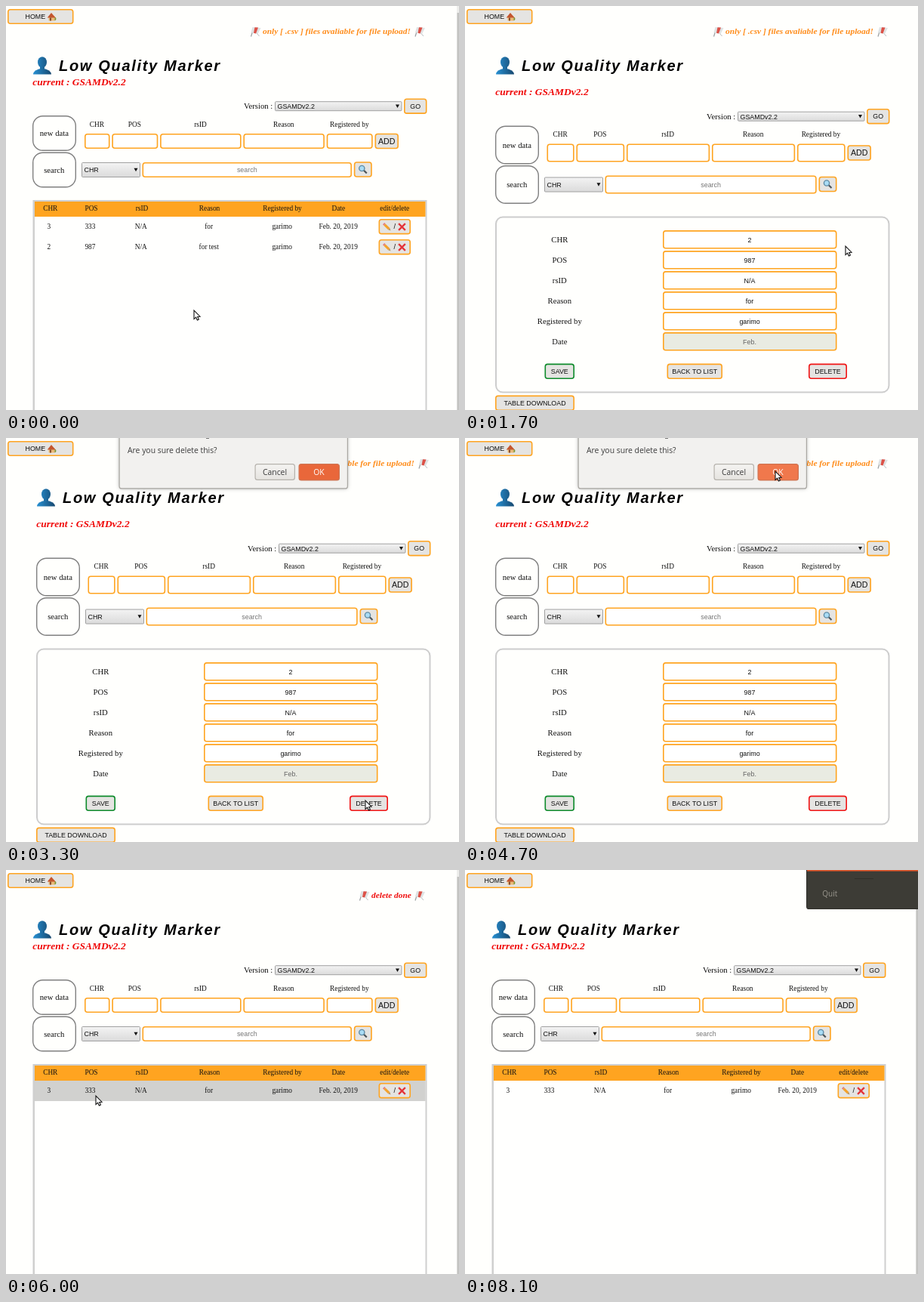
Write an HTML page with a canvas that moves like this. It is 600 px wide and 535 px high and loops after 8.3 s.

```html
<!DOCTYPE html>
<html lang="en">
<head>
<meta charset="utf-8">
<title>Low Quality Marker</title>
<style>
html, body { margin: 0; width: 100%; height: 100%; overflow: hidden; background: #fffffd; }
canvas { display: block; }
</style>
</head>
<body>
<canvas id="stage" width="600" height="535"></canvas>
<script>
const ctx = document.getElementById('stage').getContext('2d');
const LOOP = 8300, STEP = 100;
const SERIF = '"Liberation Serif", serif';
const SANS = '"Liberation Sans", sans-serif';
const UI = '"Open Sans", sans-serif';
const ORANGE = '#ffa420', BUTTON = '#e5e4e2', HOVER = '#d1d1cf', INK = '#111';
const SMALL = 8.89, MEDIUM = 9.33, LARGE = 10.67;
const GAP = 2.8, ROW = 27, HEAD_TOP = 259, HEAD_HEIGHT = 20;
const USER = 'garimo';

// Moments of the hard changes
const OPEN_FORM = 1700, SHOW_DIALOG = 3000, HIDE_DIALOG = 4800, BACK = 5000, MENU = 7400, MENU_HOT = 7900;

// The form page sits lower and further right, with roomier fields
const listLayout = { dx: 0, drop: 0, padX: 0, padY: 0 };
const formLayout = { dx: 5, drop: 13.5, padX: 2.7, padY: 4 };

const columns = [
  ['CHR', 41.5], ['POS', 67], ['rsID', 67], ['Reason', 112],
  ['Registered by', 81], ['Date', 67.5], ['edit/delete', 81.5]
];

// Pointer moves: from, until, x, y; it rests in between
const moves = [
  [0, 200, 400, 141], [200, 400, 535, 312], [500, 800, 561, 317], [800, 1400, 504, 318],
  [2000, 2900, 476, 480], [3400, 4300, 368, 69], [4300, 4700, 411, 44], [5400, 6000, 119, 299],
  [6300, 6600, 123, 265], [6600, 6900, 545, 30], [7300, 7500, 560, -20]
];

const clamp = v => Math.max(0, Math.min(1, v));
const ease = k => k * k * (3 - 2 * k);

function pointer(t) {
  const p = { x: 249, y: 403 };
  for (const [from, until, x, y] of moves) {
    const k = ease(clamp((t - from) / (until - from)));
    p.x += (x - p.x) * k;
    p.y += (y - p.y) * k;
  }
  return p;
}

// y is the middle of the capitals
function text(str, x, y, size, { font = SERIF, color = INK, align = 'center', style = '' } = {}) {
  ctx.font = `${style} ${size}px ${font}`;
  ctx.fillStyle = color;
  ctx.textAlign = align;
  ctx.fillText(str, x, y + size * 0.34);
}

function paint(fill, stroke, w = 1) {
  if (fill) { ctx.fillStyle = fill; ctx.fill(); }
  if (stroke) { ctx.strokeStyle = stroke; ctx.lineWidth = w; ctx.stroke(); }
}

function rect(x, y, w, h, fill) {
  ctx.fillStyle = fill;
  ctx.fillRect(x, y, w, h);
}

function box(x, y, w, h, fill, border, r = 3, line = 1.6) {
  ctx.beginPath();
  ctx.roundRect(x + line / 2, y + line / 2, w - line, h - line, r);
  paint(fill, border, line);
}

function poly(points, fill, stroke, w) {
  ctx.beginPath();
  points.forEach(([x, y]) => ctx.lineTo(x, y));
  ctx.closePath();
  paint(fill, stroke, w);
}

function line(x0, y0, x1, y1, color, w) {
  ctx.beginPath();
  ctx.moveTo(x0, y0);
  ctx.lineTo(x1, y1);
  paint(null, color, w);
}

function oval(x, y, rx, ry, fill, stroke, w, start = 0) {
  ctx.beginPath();
  ctx.ellipse(x, y, rx, ry, 0, start, Math.PI * 2);
  paint(fill, stroke, w);
}

function at(x, y, draw) {
  ctx.save();
  ctx.translate(x, y);
  draw();
  ctx.restore();
}

function shade(y, h, top, bottom) {
  const g = ctx.createLinearGradient(0, y, 0, y + h);
  g.addColorStop(0, top);
  g.addColorStop(1, bottom);
  return g;
}

function field(x, y, w, h, fill = '#fff') {
  box(x, y - h / 2, w, h, fill, ORANGE);
}

function button(x, y, w, label, { border = ORANGE, size = SMALL, h = 20.5 } = {}) {
  box(x, y - h / 2, w, h, BUTTON, border);
  text(label, x + w / 2, y, size, { font: SANS });
}

function select(x, y, w, h, label) {
  box(x, y - h / 2, w, h, shade(y - h / 2, h, '#f4f4f4', '#dadada'), '#a0a0a0', 1, 1);
  text(label, x + 3.5, y + 0.3, SMALL, { font: SANS, align: 'left' });
  at(x + w - 6, y, () => poly([[-2.5, -2.3], [2.5, -2.3], [0, 2.2]], INK));
}

function house(x, y) {
  at(x, y, () => {
    oval(4, 2.5, 2, 2.2, '#7c9a3a');
    rect(-4, -1, 8, 6, '#e8b878');
    poly([[-5.8, 1], [-0.5, -5.5], [5.2, 1]], '#c4562f');
    rect(-2.5, 1, 2, 4, '#8a5030');
  });
}

function megaphone(x, y) {
  at(x, y, () => {
    line(-4, 0, -6, 6.5, '#9a9fa1', 1.2);
    poly([[-4, -6], [7, -5], [3, 3], [-6, 1]], '#dfe3e4');
    poly([[-1, -5.8], [3.5, -5.4], [0.5, 2.4], [-2.5, 1.8]], '#dc5248');
    line(2, 2.5, 5, 6, '#b0b5b7', 0.9);
  });
}

function bust(x, y) {
  const g = ctx.createLinearGradient(x - 12, y, x + 12, y);
  g.addColorStop(0, '#2790d2');
  g.addColorStop(1, '#17486f');
  oval(x, y + 11.5, 12, 7.5, g, null, 0, Math.PI);
  rect(x - 3, y, 6, 6, g);
  oval(x, y - 4.5, 6, 7.3, g);
}

function magnifier(x, y) {
  line(x + 1, y + 1, x + 5, y + 5, '#4b5358', 2.2);
  oval(x - 1.5, y - 1.5, 3.6, 3.6, '#a9dcf5', '#5f8ba5', 1.4);
}

function pencil(x, y) {
  at(x, y, () => {
    ctx.rotate(Math.PI / 4);
    rect(-6.5, -1.6, 2, 3.2, '#e27b80');
    rect(-4.5, -1.6, 8, 3.2, '#f4a22c');
    poly([[3.5, -1.6], [6.8, 0], [3.5, 1.6]], '#b8935f');
  });
}

function cross(x, y) {
  for (const s of [-1, 1]) line(x - 4.4, y - 4.4 * s, x + 4.4, y + 4.4 * s, '#e3343a', 2.3);
}

function notice(dx, deleted) {
  const left = (deleted ? 474.5 : 330.5) + dx;
  megaphone(left, 34);
  megaphone(548 + dx, 34);
  text(deleted ? 'delete done' : 'only [ .csv ] files avaliable for file upload!',
    left + 9.5, 33, 11.4,
    { style: 'italic bold', align: 'left', color: deleted ? '#f01010' : '#ff8c1a' });
}

function heading({ dx, drop }) {
  box(2, 4, 87.5, 20, BUTTON, ORANGE);
  text('HOME', 25.5, 14.3, SMALL, { font: SANS, align: 'left' });
  house(60.5, 14.5);

  bust(48 + dx, 79);
  ctx.letterSpacing = '1.68px';
  text('Low Quality Marker', 70 + dx, 79.3, 20, { font: SANS, style: 'italic bold', align: 'left', color: '#000' });
  ctx.letterSpacing = '0px';
  text('current : GSAMDv2.2', 35.3 + dx, 100.4 + drop, 13.5, { style: 'italic bold', align: 'left', color: '#f00808' });

  const y = 132.7 + drop;
  text('Version :', 315 + dx, y, LARGE, { align: 'left' });
  select(356 + dx, y, 168.5, 13, 'GSAMDv2.2');
  button(527 + dx, y, 30.5, 'GO');
}

function toolbar({ dx, drop, padX, padY }) {
  const labelY = 156.5 + drop;
  const fieldY = labelY + 22.5 + padY / 2;
  const left = 104 + dx - padX / 5;
  let x = left;
  columns.slice(0, 5).forEach(([name], i) => {
    const w = [33.5, 61, 107.5, 107.5, 61][i] + padX;
    text(name, x + w / 2 - 0.4, labelY, MEDIUM);
    field(x, fieldY, w, 20 + padY);
    x += w + GAP;
  });
  button(x, fieldY, 31.5, 'ADD', { size: LARGE });

  const pill = 47 + padY;
  const middle = i => 145 + drop + pill / 2 + i * (pill + 1.5);
  ['new data', 'search'].forEach((name, i) => {
    box(35 + dx, middle(i) - pill / 2, 58, pill, null, '#808080', 13, 1.4);
    text(name, 63.8 + dx, middle(i), LARGE);
  });

  const y = middle(1), queryX = 180.5 + dx, queryW = 277.5 + padX;
  select(100 + dx, y, 78, 20, 'CHR');
  field(queryX, y, queryW, 20 + padY);
  text('search', queryX + queryW / 2, y + 0.3, SMALL, { font: SANS, color: '#757575' });
  const findX = queryX + queryW + GAP;
  button(findX, y - 0.5, 24, '');
  magnifier(findX + 12, y - 0.5);
}

function table(rows, p) {
  const over = (top, h) => p.x > 38 && p.x < 556 && p.y >= top && p.y < top + h;
  const headHot = over(HEAD_TOP, HEAD_HEIGHT);
  rect(35.5, 257, 522, 278, '#cfcfcf');
  rect(38, HEAD_TOP, 517.5, 276, '#fffffe');
  rect(38, HEAD_TOP, 517.5, HEAD_HEIGHT, ORANGE);
  rows.forEach((row, n) => {
    const top = HEAD_TOP + HEAD_HEIGHT + ROW * n;
    if (over(top, ROW)) rect(38, top, 517.5, ROW, HOVER);
  });

  let x = 38;
  columns.forEach(([name, w], i) => {
    const mid = x + w / 2;
    if (headHot) box(x, HEAD_TOP, w, HEAD_HEIGHT, HOVER, ORANGE, 4);
    text(name, mid, 268.3, MEDIUM);
    rows.forEach((row, n) => {
      const y = 292.2 + ROW * n;
      // Values drift from their headings towards the left edge
      if (row[i]) text(row[i], mid - 0.4 * (5 - i), y, MEDIUM);
      else {
        button(mid - 21.2, y, 42.5, '/', { size: MEDIUM });
        pencil(mid - 10, y + 0.5);
        cross(mid + 9.7, y + 0.3);
      }
    });
    x += w;
  });
  rect(597, 0, 3, 535, '#ededeb');
  rect(597.5, 9, 2.5, 526, '#c3c3c1');
}

function form() {
  box(40, 278.5, 522.5, 234, null, '#cdcdcd', 9, 2);
  ['2', '987', 'N/A', 'for', USER, 'Feb.'].forEach((value, i) => {
    const y = 309.3 + ROW * i, [name] = columns[i], locked = name === 'Date';
    text(name, 125.3, y, LARGE);
    field(262, y, 230.5, 24.5, locked ? '#e9ebe2' : '#fff');
    text(value, 377, y + 0.5, SMALL, { font: SANS, color: locked ? '#666' : INK });
  });
  button(105.5, 483.8, 39.5, 'SAVE', { border: '#0d8a2a' });
  button(267.5, 483.8, 73.5, 'BACK TO LIST');
  button(455, 483.8, 51, 'DELETE', { border: '#f01414' });
  button(40, 525.8, 105, 'TABLE DOWNLOAD');
}

function dialog(shown, hot) {
  ctx.save();
  ctx.globalAlpha = shown;
  ctx.translate(0, (shown - 1) * 20);
  ctx.shadowColor = 'rgba(0,0,0,.35)';
  ctx.shadowBlur = 5;
  box(149.5, -30, 303.5, 97.5, '#f2f1ef');
  ctx.shadowColor = 'transparent';
  box(149.5, -30, 303.5, 97.5, null, '#aaa8a4', 3, 1.2);
  rect(265, 0, 4, 1, '#777');
  text('Are you sure delete this?', 161, 16.3, 10.4, { font: UI, color: '#3c3c3c', align: 'left' });
  box(329.5, 34, 53.5, 22, shade(34, 22, '#f5f4f2', '#e5e3df'), '#b5b2ac', 3, 1.2);
  text('Cancel', 356, 45.2, 10.4, { font: UI, color: '#3c3c3c', style: '500' });
  box(387.5, 34, 54.5, 22.5, hot ? '#f0784c' : '#e9673a', '#cf7350', 3, 1.2);
  text('OK', 414.5, 45.2, 10.4, { font: UI, color: '#fff', style: '500' });
  ctx.restore();
}

function menu(t) {
  const hot = t >= MENU_HOT;
  ctx.save();
  ctx.globalAlpha = clamp((t - MENU + STEP) / 300);
  box(452, -10, 154, 62, '#3d3c36', '#33322d', 3, 1.2);
  line(516, 11.5, 541, 11.5, '#302f2a', 1);
  text('Quit', 473.3, 31.5, 10, { font: UI, color: hot ? '#9a978e' : '#c9c6bd', align: 'left' });
  if (hot) {
    rect(453, 0, 147, 1.6, '#e2592c');
    for (let x = 454; x < 600; x += 4) rect(x, 1, 1.5, 1, '#a8472a');
  }
  ctx.restore();
}

function arrow() {
  poly([[0, 0], [0, 11.6], [2.6, 9.2], [4.4, 13], [6.4, 12.1], [4.7, 8.4], [8, 8.2]], '#fff', INK, 1.1);
}

function beam() {
  for (const [color, w] of [['#fff', 2.4], [INK, 1.2]]) {
    line(0, -4.8, 0, 4.8, color, w);
    for (const y of [-4.8, 4.8]) line(-2.2, y, 2.2, y, color, w);
  }
}

function draw(t) {
  const p = pointer(t);
  const onForm = t >= OPEN_FORM && t < BACK;
  const deleted = t >= BACK;
  const layout = onForm ? formLayout : listLayout;

  rect(0, 0, 600, 535, '#fffffd');
  notice(layout.dx, deleted);
  heading(layout);
  toolbar(layout);
  if (onForm) {
    form();
  } else {
    const rows = [['3', '333', 'N/A', 'for', USER, 'Feb. 20, 2019']];
    if (!deleted) rows.push(['2', '987', 'N/A', 'for test', USER, 'Feb. 20, 2019']);
    table(rows, p);
  }

  const shown = Math.min(clamp((t - SHOW_DIALOG + STEP) / 400), clamp((HIDE_DIALOG + STEP - t) / 200));
  if (shown > 0) dialog(shown, p.x > 388 && p.y < 56);
  if (t >= MENU) menu(t);

  const overHead = deleted && p.y >= HEAD_TOP && p.y < HEAD_TOP + HEAD_HEIGHT;
  at(p.x, p.y, overHead ? beam : arrow);
}

function tick() {
  const t = performance.now() % LOOP;
  draw(Math.floor(t / STEP) * STEP);
  requestAnimationFrame(tick);
}
tick();
</script>
</body>
</html>
```
